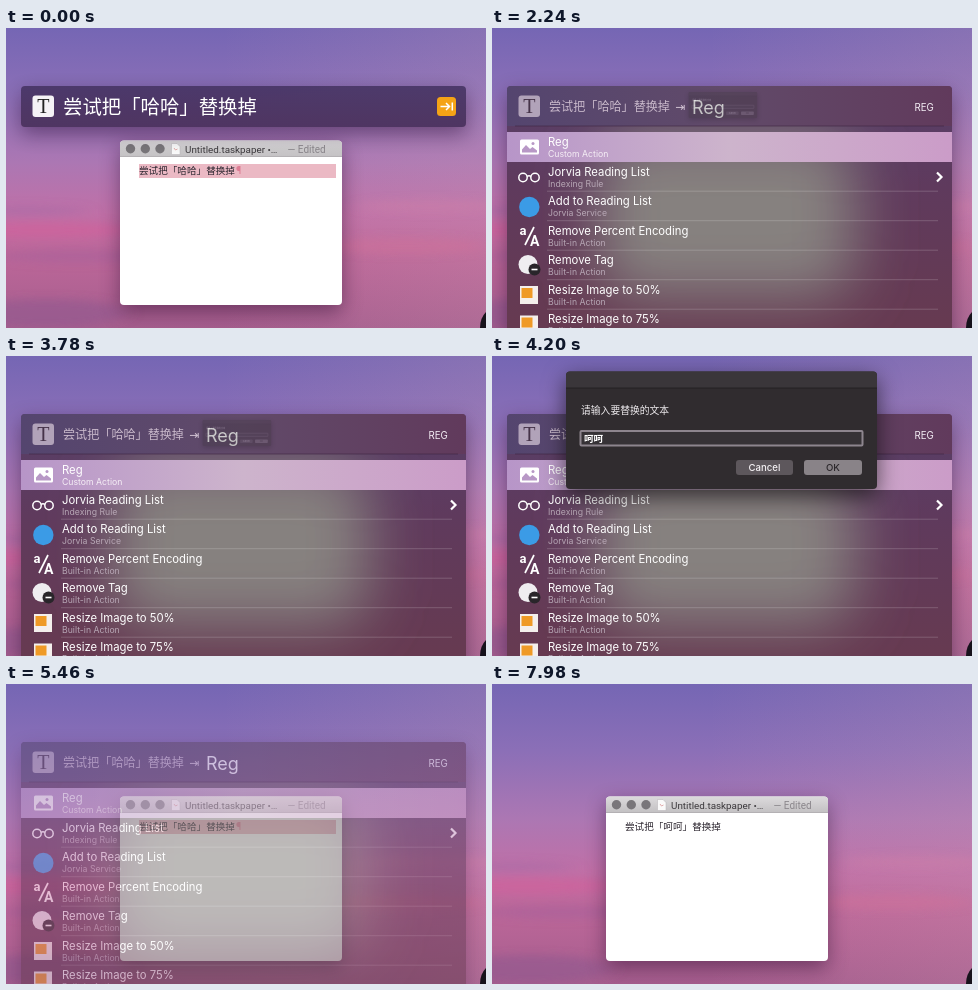
An HTML page that plays this animation: 480x300 px, repeating every 8.26 s.

```html
<!DOCTYPE html>
<html lang="zh-CN">
<head>
<meta charset="utf-8">
<style>
html, body { margin: 0; width: 100%; height: 100%; overflow: hidden; background: #a0709f; }
svg { display: block; width: 480px; height: 300px; font-family: Roboto, "Noto Sans CJK SC", "Noto Sans CJK", sans-serif; }
text { white-space: pre; }
.ui { font-family: Inter, "Noto Sans CJK SC", sans-serif; }
.serif { font: 20px "Liberation Serif", serif; text-anchor: middle; }
.shadow { filter: drop-shadow(0 7px 10px rgba(30, 5, 40, .45)); }
.deep { filter: drop-shadow(0 7px 11px rgba(0, 0, 0, .6)); }
</style>
</head>
<body>
<svg viewBox="0 0 480 300">
  <defs>
    <linearGradient id="sky" x2="0" y2="1">
      <stop offset="0" stop-color="#7566b4"/>
      <stop offset=".22" stop-color="#8b6fb7"/>
      <stop offset=".45" stop-color="#ac77b3"/>
      <stop offset=".62" stop-color="#c070a7"/>
      <stop offset=".75" stop-color="#bd6799"/>
      <stop offset="1" stop-color="#a65e8e"/>
    </linearGradient>
    <linearGradient id="haze">
      <stop offset=".45" stop-color="#d0a0b4" stop-opacity="0"/>
      <stop offset="1" stop-color="#d0a0b4" stop-opacity=".2"/>
    </linearGradient>
    <linearGradient id="chrome" x2="0" y2="1">
      <stop offset="0" stop-color="#dcdadc"/>
      <stop offset="1" stop-color="#c3c1c3"/>
    </linearGradient>
    <linearGradient id="barFill" x2="0" y2="1">
      <stop offset="0" stop-color="#4b3869"/>
      <stop offset="1" stop-color="#4d335f"/>
    </linearGradient>
    <linearGradient id="panelFill" x2="0" y2="1">
      <stop offset="0" stop-color="#573f68"/>
      <stop offset=".4" stop-color="#5f3a5d"/>
      <stop offset="1" stop-color="#673a50"/>
    </linearGradient>
    <linearGradient id="head">
      <stop offset="0" stop-color="#54456f"/>
      <stop offset=".5" stop-color="#614a69"/>
      <stop offset="1" stop-color="#613a5c"/>
    </linearGradient>
    <linearGradient id="pick">
      <stop offset="0" stop-color="#b795c8"/>
      <stop offset=".5" stop-color="#cdb4cc"/>
      <stop offset="1" stop-color="#cb9cc8"/>
    </linearGradient>
    <filter id="soft" x="-50%" y="-150%" width="200%" height="400%"><feGaussianBlur stdDeviation="9 4"/></filter>
    <filter id="glow" x="-50%" y="-50%" width="200%" height="200%"><feGaussianBlur stdDeviation="30"/></filter>
    <clipPath id="body"><rect x="15" y="98" width="445" height="202"/></clipPath>
  </defs>

  <rect width="480" height="300" fill="url(#sky)"/>
  <rect width="480" height="300" fill="url(#haze)"/>
  <g filter="url(#soft)">
    <ellipse cx="35" cy="202" rx="95" ry="8" fill="#d2629c" opacity=".6"/>
    <ellipse cx="20" cy="183" rx="60" ry="5" fill="#a468a6" opacity=".5"/>
    <ellipse cx="70" cy="228" rx="80" ry="7" fill="#a5609b" opacity=".5"/>
    <ellipse cx="425" cy="178" rx="75" ry="6" fill="#d080a8" opacity=".4"/>
    <ellipse cx="400" cy="218" rx="80" ry="8" fill="#cf7099" opacity=".5"/>
    <ellipse cx="40" cy="285" rx="80" ry="14" fill="#91598f" opacity=".6"/>
  </g>
  <path d="M474 300q0-10 6-16v16z" fill="#17131c"/>

  <g class="shadow">
    <rect x="114" y="112.500" width="222" height="164.500" rx="4" fill="#fff"/>
    <path d="M114 128.500v-12q0-4 4-4h214q4 0 4 4v12z" fill="url(#chrome)"/>
  </g>
  <path d="M114 128.500h222" stroke="#a9a5a9" stroke-width=".8"/>
  <g fill="#79767a"><circle cx="124.500" cy="120.800" r="4.700"/><circle cx="139.300" cy="120.800" r="4.700"/><circle cx="154" cy="120.800" r="4.700"/></g>
  <path d="M165.500 115.500h5.500l3 3v8h-8.500z" fill="#fafafa" stroke="#b5b0b5" stroke-width=".5"/>
  <path d="M168 120l1.500 2 2-1" fill="none" stroke="#d99" stroke-width=".8"/>
  <text x="179" y="124.700" font-size="9.850" fill="#3b383c">Untitled.taskpaper •…</text>
  <text x="281.500" y="124.700" font-size="10" fill="#8b878c">— Edited</text>
  <rect id="mark" x="133" y="136" width="197" height="14" fill="#ebb9c4"/>
  <text id="line" x="133" y="146" font-size="9.600" font-weight="500" fill="#2d2730"></text>
  <text id="pilcrow" x="230" y="146" font-size="11" fill="#dd7d94">¶</text>
  <rect id="caret" x="133" y="148" width="1" height="14" fill="#444"/>

  <g id="bar">
    <rect class="shadow" x="15" y="58" width="445" height="41" rx="4" fill="url(#barFill)" opacity=".97"/>
    <rect x="26.500" y="67.500" width="21.500" height="21.500" rx="3" fill="#f5f2f6"/>
    <text class="serif" x="37.300" y="85" fill="#222">T</text>
    <text x="57" y="85.700" font-size="19.400" font-weight="300" fill="#fff">尝试把「哈哈」替换掉</text>
    <rect x="431" y="69" width="19" height="19" rx="3.500" fill="#f5a316"/>
    <path d="M434.500 78.500h9m-3.500-3.500l3.500 3.500-3.500 3.500M446.300 74.500v8" fill="none" stroke="#fff" stroke-width="1.500"/>
  </g>

  <g id="panel">
    <path class="shadow" d="M15 310V62q0-4 4-4h437q4 0 4 4v248z" fill="url(#panelFill)"/>
    <g clip-path="url(#body)">
      <rect x="105" y="105" width="258" height="165" rx="40" fill="#86817f" filter="url(#glow)"/>
    </g>
    <path d="M15 98V62q0-4 4-4h437q4 0 4 4v36z" fill="url(#head)"/>
    <path d="M23 98h429" stroke="#3f2540" opacity=".6"/>
    <rect x="26.500" y="67.500" width="21.500" height="21.500" rx="3" fill="#d8cbd8" opacity=".7"/>
    <text class="serif" x="37.300" y="85" fill="#463349">T</text>
    <text x="57" y="83" font-size="12.100" fill="#c9b9cb">尝试把「哈哈」替换掉</text>
    <text x="183.500" y="82.500" font-size="12" fill="#cfc0d0" font-family="DejaVu Sans, sans-serif">⇥</text>
    <g class="ui">
      <text x="200" y="86" font-size="18" fill="#fff">Reg</text>
      <text x="422.500" y="82.600" font-size="9.700" fill="#f4eef5">REG</text>
    </g>
    <path id="under" d="M422.500 84.500h19" stroke="#8583cf"/>
    <rect x="15" y="104" width="445" height="30" fill="url(#pick)"/>
    <g id="rows" class="ui"></g>
    <g fill="none" stroke="#fff" stroke-width="1.500">
      <circle cx="31" cy="149.500" r="4.200"/><circle cx="43" cy="149.500" r="4.200"/><path d="M35 148.500q2-1.500 4 0"/>
      <path d="M445 144.500l4.500 4.500-4.500 4.500" stroke-width="2.200"/>
      <path d="M33 217l9-18" stroke-width="1.700"/>
    </g>
    <rect x="28" y="111.500" width="19" height="15" rx="1.500" fill="#fff"/>
    <path d="M30 124.500v-3l4-4.500 4 4 2.500-2 4.500 3.500v2z" fill="#b898c6"/><circle cx="41" cy="115.500" r="1.500" fill="#b898c6"/>
    <circle cx="37.300" cy="179" r="10.200" fill="#3b9be6"/>
    <g fill="#fff" font-weight="700"><text x="27.500" y="207" font-size="13">a</text><text x="38" y="217.500" font-size="14">A</text></g>
    <circle cx="36" cy="236.500" r="9.500" fill="#efedf0"/>
    <circle cx="42.500" cy="241.500" r="6" fill="#29252a"/><path d="M39.500 241.500h6" stroke="#fff" stroke-width="1.600"/>
    <g id="pics"></g>
  </g>

  <g id="dialog">
    <rect class="deep" x="74" y="15.500" width="311" height="117.500" rx="4" fill="#302c2f"/>
    <path d="M74 32V19.500q0-4 4-4h303q4 0 4 4V32z" fill="#3a363a"/>
    <path d="M74 32h311" stroke="#1f1c1f" stroke-width=".8"/>
    <text x="89" y="57.700" font-size="9.800" font-weight="500" fill="#eeebee">请输入要替换的文本</text>
    <rect x="88.500" y="75" width="282" height="14.500" rx="1" fill="#363236" stroke="#8d858e" stroke-width="2"/>
    <text id="entry" x="92" y="86" font-size="9.600" font-weight="700" fill="#fff"></text>
    <rect x="244" y="104" width="57" height="15" rx="3" fill="#5d575c"/>
    <rect x="312" y="104" width="58" height="15" rx="3" fill="#898388"/>
    <g class="ui" font-size="9.600" font-weight="500" text-anchor="middle">
      <text x="272.500" y="115" fill="#f5f2f5">Cancel</text><text x="341" y="115" fill="#2b272b">OK</text>
    </g>
  </g>
</svg>
<script>
const $ = id => document.getElementById(id);
const clamp = v => Math.max(0, Math.min(1, v));
const fade = (id, v) => $(id).setAttribute('opacity', v);
const LOOP = 8260, STEP = 140;

const rows = [
  ['Reg', 'Custom Action'],
  ['Jorvia Reading List', 'Indexing Rule'],
  ['Add to Reading List', 'Jorvia Service'],
  ['Remove Percent Encoding', 'Built-in Action'],
  ['Remove Tag', 'Built-in Action'],
  ['Resize Image to 50%', 'Built-in Action'],
  ['Resize Image to 75%', 'Built-in Action']
];
$('rows').innerHTML = rows.map(([title, note], i) => {
  const y = 118.2 + 29.5 * i;
  return `<text x="56" y="${y}" font-size="11.3" fill="#fff">${title}</text>
    <text x="56" y="${y + 11}" font-size="8.7" fill="${i ? '#b7a7b5' : '#f6eff6'}">${note}</text>` +
    (i ? `<path d="M55 ${y + 15.5}h391" stroke="#fff" stroke-width=".8" opacity=".22"/>` : '');
}).join('');
$('pics').innerHTML = [258, 287.5].map(y =>
  `<rect x="28" y="${y}" width="18" height="18" fill="#f4efec"/>
   <rect x="29.500" y="${y + 2}" width="11" height="10" fill="#ef9a26"/>`).join('');

// Prompt opens small, snaps to full size, then fades out.
function prompt(step, open, close, typed, word) {
  const opening = step === open;
  fade('dialog', opening ? 0.28 : clamp(1 - 0.4 * (step - close + 1)));
  $('dialog').setAttribute('transform', opening ? 'translate(231 77) scale(.22) translate(-230 -74)' : '');
  $('entry').textContent = step >= typed ? word : '';
}

function draw(now) {
  const step = Math.floor(now % LOOP / STEP);
  const swapped = step >= 41;
  $('line').textContent = `尝试把「${swapped ? '呵呵' : '哈哈'}」替换掉`;
  fade('mark', swapped ? 0 : 1);
  fade('pilcrow', swapped ? 0 : 1);
  fade('caret', clamp((step - 42) / 3) - clamp((step - 46) / 3) + clamp((step - 51) / 3) - clamp((step - 55) / 2));
  fade('bar', step < 8 ? 1 : 0);
  fade('panel', step < 8 ? 0 : clamp(1 - 0.45 * (step - 38)));
  fade('under', clamp((14 - step) / 3));
  if (step >= 16 && step < 27) prompt(step, 16, 24, 21, '哈哈');
  else if (step >= 27 && step < 36) prompt(step, 27, 32, 30, '呵呵');
  else fade('dialog', 0);
}

const start = performance.now();
function tick() {
  draw(performance.now() - start);
  requestAnimationFrame(tick);
}
tick();
</script>
</body>
</html>
```
